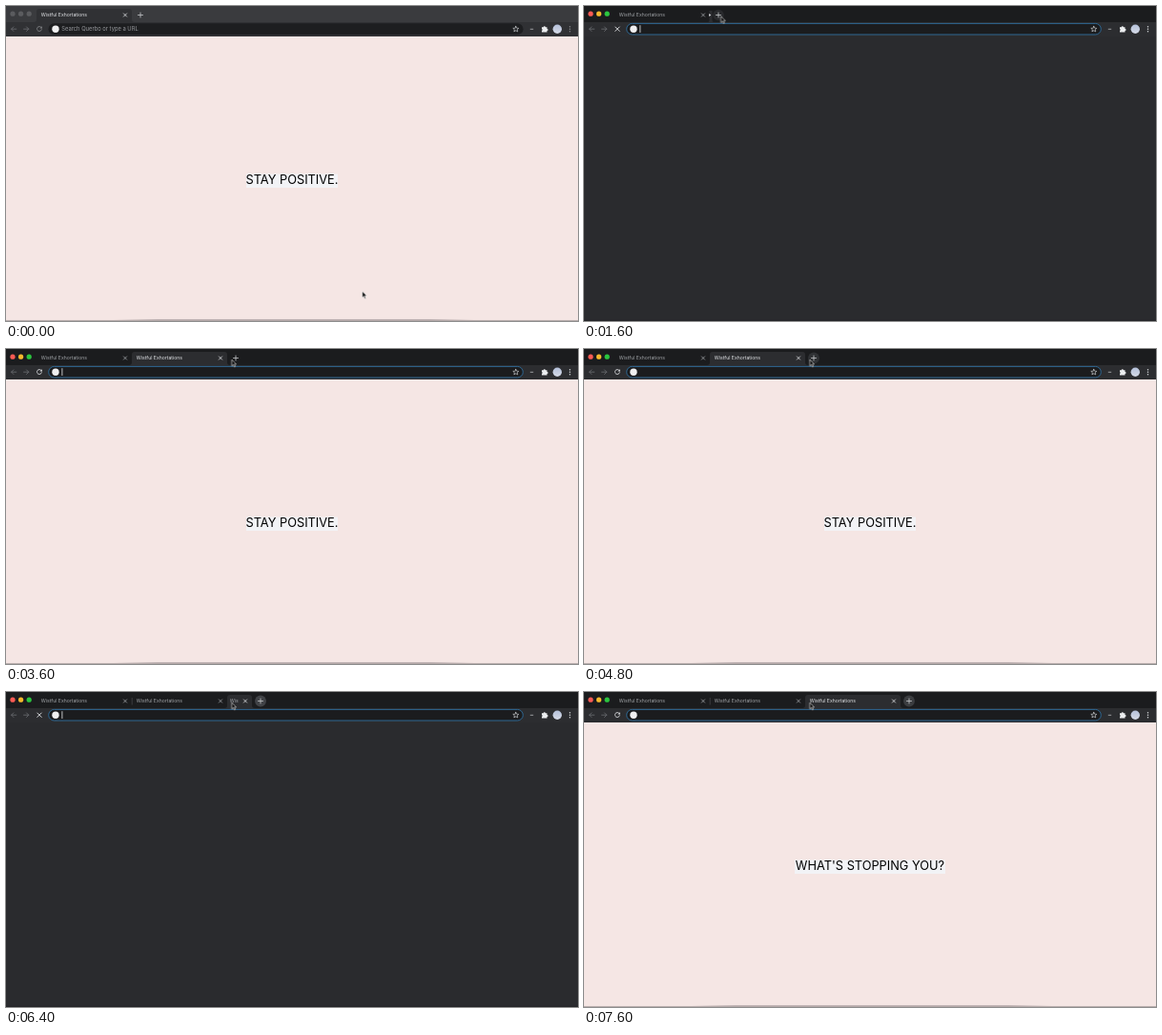
These frames come from a looping animation (600 by 331 pixels, 8000 ms). An HTML page:

```html
<!DOCTYPE html>
<html lang="en">
<head>
<meta charset="utf-8">
<title>New tab</title>
<style>
  html, body { margin: 0; width: 100%; height: 100%; overflow: hidden; background: #2a2b2e; }
  svg { display: block; width: 100vw; height: 100vh; }
  text { font-family: Inter, "Open Sans", sans-serif; }
  .title { font-size: 5.1px; }
  .quote { font-size: 12.8px; text-anchor: middle; }
  .line { fill: none; stroke-linecap: round; stroke-linejoin: round; }
  .lit { fill: #e4e6e9; color: #e4e6e9; }
  .dim { fill: #a2a5a9; color: #a2a5a9; }

  /* Every change is a hard cut on a 400 ms (5%) grid. */
  .idle, .open1, .ready, .open2, .done, .focus, .load, .page, .caret, .hover, .press, #cursor {
    animation: 8s step-end infinite;
  }
  .idle  { animation-name: idle; }
  .focus { animation-name: focus; }
  .open1 { animation-name: open1; }
  .ready { animation-name: ready; }
  .open2 { animation-name: open2; }
  .done  { animation-name: done; }
  .load  { animation-name: load; }
  .page  { animation-name: page; }
  .caret { animation-name: caret; }
  .hover { animation-name: hover; }
  .press { animation-name: press; }
  #cursor { animation-name: move; }

  @keyframes idle  { 0% { visibility: visible } 20%, 100% { visibility: hidden } }
  @keyframes focus { 0% { visibility: hidden } 20%, 100% { visibility: visible } }
  @keyframes open1 { 0%, 25%, 100% { visibility: hidden } 20% { visibility: visible } }
  @keyframes ready { 0%, 80%, 100% { visibility: hidden } 25% { visibility: visible } }
  @keyframes open2 { 0%, 85%, 100% { visibility: hidden } 80% { visibility: visible } }
  @keyframes done  { 0% { visibility: hidden } 85%, 100% { visibility: visible } }
  @keyframes load  { 0%, 25%, 85%, 100% { visibility: hidden } 20%, 80% { visibility: visible } }
  @keyframes page  { 0%, 25%, 85%, 100% { visibility: visible } 20%, 80% { visibility: hidden } }
  @keyframes caret {
    0%, 35%, 60%, 95%, 100% { visibility: hidden }
    20%, 40%, 70% { visibility: visible }
  }
  @keyframes hover { 0%, 75%, 100% { visibility: hidden } 50% { visibility: visible } }
  @keyframes press { 0%, 80%, 100% { visibility: hidden } 75% { visibility: visible } }
  @keyframes move {
    0%  { transform: translate(373.7px, 299.8px) }
    5%  { transform: translate(152.7px, 20.3px) }
    10% { transform: translate(146px, 13.6px) }
    15% { transform: translate(143.6px, 10.7px) }
    35% { transform: translate(167px, 12px) }
    40% { transform: translate(232px, 6.5px) }
    45% { transform: translate(236.8px, 11.2px) }
    50% { transform: translate(236px, 10.5px) }
    55%, 100% { transform: translate(236.8px, 11.2px) }
  }
</style>
</head>
<body>
<svg viewBox="0 0 600 331" preserveAspectRatio="none">
  <defs>
    <path id="tab" d="M29 17q3 0 3-3V6q0-3 3-3h94q3 0 3 3v8q0 3 3 3z"/>
    <text id="name" class="title" x="36.8" y="11.4">Wistful Exhortations</text>
    <path id="close" class="line" d="M-1.6-1.6l3.2 3.2m0-3.2l-3.2 3.2" stroke="currentColor" stroke-width=".8"/>
    <path id="plus" class="line" d="M-2.5 0h5M0-2.5v5" stroke="#c6c8cb" stroke-width=".8"/>
    <g id="label"><use href="#name"/><use href="#close" x="125" y="9.5"/></g>
    <path id="split" d="M132.2 6v7.5" stroke="#4b4d51" stroke-width=".7"/>
    <g id="reload">
      <path class="line" d="M37 22.5a2.5 2.5 0 1 0 .4 2.3" stroke="currentColor" stroke-width=".85"/>
      <path d="M37.8 21.2v2.3h-2.3z" fill="currentColor"/>
    </g>
    <g id="dots"><circle cx="591.5" cy="21.7" r=".75"/><circle cx="591.5" cy="24.2" r=".75"/><circle cx="591.5" cy="26.7" r=".75"/></g>
    <clipPath id="sliver"><path d="M235 5h9v9h-9z"/></clipPath>
    <linearGradient id="dock">
      <stop offset="0" stop-color="#8d8285" stop-opacity="0"/>
      <stop offset=".12" stop-color="#8d8285" stop-opacity=".5"/>
      <stop offset=".88" stop-color="#8d8285" stop-opacity=".5"/>
      <stop offset="1" stop-color="#8d8285" stop-opacity="0"/>
    </linearGradient>
    <linearGradient id="face" x2="0" y2="1">
      <stop offset="0" stop-color="#b4c0da"/>
      <stop offset="1" stop-color="#d5dae6"/>
    </linearGradient>
  </defs>

  <!-- page -->
  <path fill="#2a2b2e" d="M0 0h600v331H0z"/>
  <path fill="#242528" d="M0 329.8h600v1.2H0z"/>
  <g class="page">
    <path fill="#f5e6e4" d="M0 32h600v299H0z"/>
    <path fill="url(#dock)" d="M113 329h378v1.4H113z"/>
    <path fill="#a79c9c" d="M0 330.2h600v.8H0z"/>
  </g>
  <g class="idle">
    <path fill="#f2f3f6" d="M252 176.5h96V191h-96z"/>
    <text class="quote" x="300" y="186.5">STAY POSITIVE.</text>
  </g>
  <g class="ready">
    <path fill="#f2f3f6" d="M252 176.5h96V191h-96z"/>
    <text class="quote" x="300" y="186.5">STAY POSITIVE.</text>
  </g>
  <g class="done">
    <path fill="#f2f3f6" d="M221 176.5h158V191H221z"/>
    <text class="quote" x="300" y="186.5">WHAT'S STOPPING YOU?</text>
  </g>

  <!-- window in the background -->
  <g class="idle">
    <path fill="#3a3b3e" d="M0 0h600v17H0z"/>
    <path fill="#303134" d="M0 17h600v15H0z"/>
    <use href="#tab" fill="#303134"/>
    <g fill="#5b5c5f"><circle cx="7" cy="8.2" r="2.6"/><circle cx="15.6" cy="8.2" r="2.6"/><circle cx="24.2" cy="8.2" r="2.6"/></g>
    <use href="#label" class="lit"/>
    <use href="#plus" x="141" y="9.5"/>
    <use href="#reload" color="#85878a"/>
    <use href="#dots" fill="#85878a"/>
    <rect x="44.5" y="18.3" width="498" height="11.8" rx="5.9" fill="#1d1e20"/>
    <text x="58.3" y="26.3" font-size="5.8" fill="#989a9e">Search Querbo or type a URL</text>
  </g>

  <!-- window in front -->
  <g class="focus">
    <path fill="#1b1c1e" d="M0 0h600v17H0z"/>
    <path fill="#2c2d30" d="M0 17h600v15H0z"/>
    <circle cx="7" cy="8.2" r="2.6" fill="#fc5b54"/>
    <circle cx="15.6" cy="8.2" r="2.6" fill="#f6b92d"/>
    <circle cx="24.2" cy="8.2" r="2.6" fill="#2bc53f"/>
    <use href="#label" class="dim"/>
    <use href="#dots" fill="#d6d8db"/>
    <rect x="44.7" y="18.4" width="497.6" height="11.6" rx="5.8" fill="#1b1c1e" stroke="#2f6f9f" stroke-width=".9"/>
  </g>
  <g class="open1">
    <path fill="#2c2d30" d="M130 17q1.500 0 1.500-3V5h3v9q0 3 1.500 3z"/>
    <path fill="#e4e6e9" d="M131.200 7.900l2 1.600-2 1.600z"/>
    <circle cx="141" cy="9.500" r="5.800" fill="#292a2d"/>
    <use href="#plus" x="141" y="9.500"/>
  </g>
  <g class="ready">
    <use href="#tab" x="100" fill="#2c2d30"/>
    <use href="#label" x="100" class="lit"/>
  </g>
  <circle class="hover" cx="241" cy="9.5" r="5.9" fill="#303235"/>
  <circle class="press" cx="241" cy="9.5" r="5.9" fill="#505255"/>
  <use class="ready" href="#plus" x="241" y="9.5"/>
  <g class="open2">
    <use href="#split"/>
    <use href="#label" x="100" class="dim"/>
    <path fill="#2c2d30" d="M229 17q3 0 3-3V6q0-3 3-3h20q3 0 3 3v8q0 3 3 3z"/>
    <g clip-path="url(#sliver)"><use href="#name" x="198" class="dim"/></g>
    <use href="#close" x="251" y="9.5" class="lit"/>
    <circle cx="267" cy="9.5" r="5.9" fill="#414347"/>
    <use href="#plus" x="267" y="9.5"/>
  </g>
  <g class="done">
    <use href="#split"/>
    <use href="#label" x="100" class="dim"/>
    <use href="#tab" x="200" fill="#2c2d30"/>
    <use href="#label" x="200" class="lit"/>
    <circle cx="341" cy="9.5" r="5.9" fill="#3b3d40"/>
    <use href="#plus" x="341" y="9.5"/>
  </g>

  <!-- toolbar -->
  <g class="line" stroke="#696b6f" stroke-width=".85">
    <path d="M10.800 24.200H5.600m2.300-2.300l-2.300 2.300 2.300 2.300"/>
    <path d="M18.600 24.200h5.200m-2.300-2.300l2.300 2.300-2.300 2.300"/>
  </g>
  <use class="ready lit" href="#reload"/>
  <use class="done lit" href="#reload"/>
  <path class="load line" d="M32.800 22l4.400 4.400m0-4.400l-4.400 4.400" stroke="#e4e6e9" stroke-width=".9"/>
  <circle cx="52" cy="24.2" r="3.7" fill="#f0f0f1"/>
  <path class="caret" d="M58.900 20.200v7.800" stroke="#e8eaed" stroke-width=".8"/>
  <path class="line" d="M534.800 21.300l.9 1.900 2.100.2-1.600 1.400.5 2.100-1.900-1.100-1.900 1.100.5-2.100-1.600-1.400 2.100-.2z" stroke="#d6d8db" stroke-width=".65"/>
  <path d="M549.800 24.300h3.400" stroke="#a6a8ab" stroke-width=".9"/>
  <path fill="#eceef0" d="M562 22.300h1.700a1.100 1.100 0 0 1 2.200 0h1.600v1.600a1.100 1.100 0 0 1 0 2.200v1.300H562v-1.500a1.100 1.100 0 0 0 0-2z"/>
  <circle cx="578.300" cy="24.200" r="4.700" fill="url(#face)"/>

  <path id="cursor" d="M0 0v6.600l1.500-1.400 1.100 2.500 1.100-.5-1.100-2.400h2.100z" fill="#0a0a0a" stroke="#fff" stroke-width=".55" stroke-linejoin="round"/>
</svg>
</body>
</html>
```
